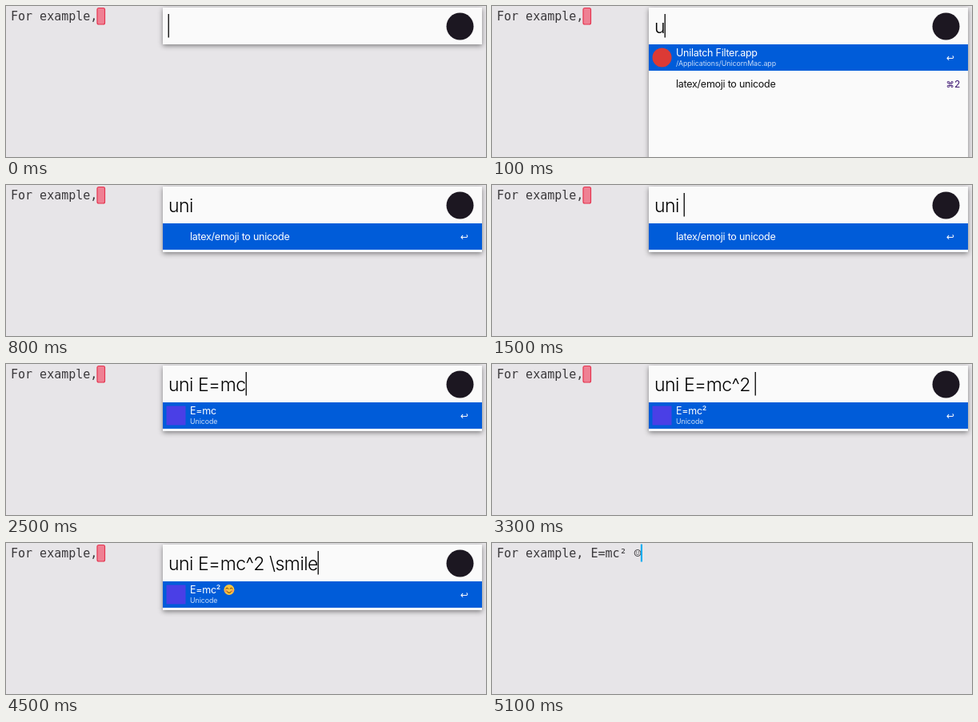
Write an HTML page with a canvas that moves like this. It is 600 px wide and 189 px high and loops after 5.6 s.

```html
<!DOCTYPE html>
<html lang="en">
<head>
<meta charset="utf-8">
<title>Launcher typing</title>
<style>
  html, body { margin: 0; width: 100%; height: 100%; overflow: hidden; background: #e7e5e8; }
  canvas { display: block; width: 600px; height: 189px; }
</style>
</head>
<body>
<canvas id="stage"></canvas>
<script>
const W = 600, H = 189, LOOP = 5600;
const canvas = document.getElementById('stage');
const ctx = canvas.getContext('2d');
const ratio = window.devicePixelRatio || 1;
canvas.width = W * ratio;
canvas.height = H * ratio;

const SANS = 'Inter, "Open Sans", sans-serif';
const MONO = '"DejaVu Sans Mono", monospace';
const SYMBOLS = '"DejaVu Sans", sans-serif';
const PANEL = { x: 196, y: 2, w: 399, head: 48, row: 33, foot: 3 };

const dot = (color, r) => ({ color, r });
const square = color => ({ color, side: 24 });

const app = {
  icon: dot('#dc3a35', 12),
  title: 'Unilatch Filter.app',
  sub: '/Applications/UnicornMac.app'
};
const keyword = { title: 'latex/emoji to unicode' };
const result = (title, face) => ({ icon: square('#4a3fe6'), title, sub: 'Unicode', face });
const search = (name, icon) => ({ icon, title: `Search ${name} for 'uni E=mc^2 \\'` });
const searches = [
  search('Tundle', dot('#4285f4', 13)),
  search('Mirvon', dot('#221f1f', 12)),
  search('Lexoramia', dot('#222222', 12))
];

// Each step: start time, typed query, result rows, fixed panel bottom
const steps = [
  [0, '', []],
  [100, 'u', [app, keyword], 200],
  [200, 'un', [app, keyword], 200],
  [300, 'uni', [app, keyword]],
  [400, 'uni ', [keyword]],
  [1700, 'uni E', [keyword]],
  [1800, 'uni E', [result('E')]],
  [2300, 'uni E=', [result('E=')]],
  [2400, 'uni E=m', [result('E=m')]],
  [2500, 'uni E=mc', [result('E=mc')]],
  [3100, 'uni E=mc^', [result('E=mc^')]],
  [3200, 'uni E=mc^2', [result('E=mc²')]],
  [3300, 'uni E=mc^2 ', [result('E=mc²')]],
  [3700, 'uni E=mc^2 \\', searches],
  [3800, 'uni E=mc^2 \\', [result('E=mc² \\')]],
  [4100, 'uni E=mc^2 \\s', [result('E=mc² \\s')]],
  [4200, 'uni E=mc^2 \\sm', [result('E=mc² \\sm')]],
  [4300, 'uni E=mc^2 \\smi', [result('E=mc² \\smi')]],
  [4400, 'uni E=mc^2 \\smil', [result('E=mc² \\smil')]],
  [4500, 'uni E=mc^2 \\smile', [result('E=mc² ', true)]]
];
const caretOff = [[800, 1500], [2900, 3100]];
const CLOSE = 4700, BLUR = 4800, PASTE = 4900, CARET = 5100;

function text(str, x, y, font, color, spacing = 0) {
  ctx.font = font;
  ctx.letterSpacing = spacing + 'px';
  ctx.fillStyle = color;
  ctx.fillText(str, x, y);
  return x + ctx.measureText(str).width;
}

function rect(x, y, w, h, color) {
  ctx.fillStyle = color;
  ctx.fillRect(x, y, w, h);
}

function disc(x, y, r, color) {
  ctx.fillStyle = color;
  ctx.beginPath();
  ctx.arc(x, y, r, 0, Math.PI * 2);
  ctx.fill();
}

function arc(x, y, r, from, to) {
  ctx.beginPath();
  ctx.arc(x, y, r, from * Math.PI, to * Math.PI);
  ctx.stroke();
}

function drawFace(x, y) {
  disc(x, y, 6.5, '#fcc53d');
  disc(x - 4, y + 1.5, 1.5, '#f5915a');
  disc(x + 4, y + 1.5, 1.5, '#f5915a');
  ctx.strokeStyle = '#6b3d13';
  ctx.lineWidth = 1;
  arc(x - 2.6, y - 0.8, 1.4, 1, 2);
  arc(x + 2.6, y - 0.8, 1.4, 1, 2);
  arc(x, y + 1, 2.8, 0.1, 0.9);
}

function drawIcon(icon, x, y) {
  if (icon.r) disc(x, y, icon.r, icon.color);
  else rect(x - icon.side / 2, y - icon.side / 2, icon.side, icon.side, icon.color);
}

function drawRow(row, i) {
  const y = PANEL.head + i * PANEL.row;
  const selected = i === 0;
  const ink = selected ? '#ffffff' : '#111111';
  if (selected) rect(PANEL.x, y, PANEL.w, PANEL.row, '#005cd9');
  if (row.icon) drawIcon(row.icon, 212.5, y + 16.5);

  const end = text(row.title, 230, y + (row.sub ? 15 : 21), '12.5px ' + SANS, ink, -0.25);
  if (row.sub) text(row.sub, 230, y + 26.5, '8.8px ' + SANS, selected ? '#c9dcf7' : '#666666', -0.05);
  if (row.face) drawFace(end + 7.5, y + 10.5);

  if (selected) text('↩', 568, y + 21, '12px ' + SYMBOLS, ink);
  else {
    const x = text('⌘', 567.5, y + 21, '10.5px ' + SYMBOLS, '#3b1470');
    text(String(i + 1), x, y + 21, '12px ' + SANS, '#3b1470');
  }
}

function drawPanel(t) {
  const [, query, rows, bottom] = steps.filter(step => step[0] <= t).pop();
  const listEnd = PANEL.head + (rows.length ? rows.length * PANEL.row + PANEL.foot : 0);
  const height = (bottom || listEnd) - PANEL.y;

  ctx.save();
  ctx.shadowColor = 'rgba(0, 0, 0, 0.45)';
  ctx.shadowBlur = 6 * ratio;
  ctx.shadowOffsetY = 1.5 * ratio;
  rect(PANEL.x, PANEL.y, PANEL.w, height, '#fafafa');
  ctx.restore();

  disc(567.5, 25.5, 17, '#1c1721');
  rows.forEach(drawRow);

  const end = text(query, 203, 34, '300 23px ' + SANS, '#000000', -0.5);
  const hidden = caretOff.some(([from, to]) => t >= from && t < to);
  if (!hidden) rect(Math.round(end) - 0.5, 10, 1.5, 29.5, '#222222');
}

function drawBlockCursor() {
  ctx.beginPath();
  ctx.roundRect(114, 2.5, 9.5, 20.5, 2);
  ctx.fillStyle = '#ef8093';
  ctx.fill();
  ctx.strokeStyle = '#e5344f';
  ctx.lineWidth = 1.2;
  ctx.stroke();
}

function draw(t) {
  ctx.setTransform(ratio, 0, 0, ratio, 0, 0);
  rect(0, 0, W, H, '#e7e5e8');
  const line = 'For example,' + (t >= PASTE ? ' E=mc² ☺' : '');
  text(line, 6, 18, '15px ' + MONO, '#3a383b');
  if (t < BLUR) drawBlockCursor();
  if (t < CLOSE) drawPanel(t);
  if (t >= CARET) rect(185.8, 1.5, 2.2, 22, '#16aef0');
}

const start = performance.now();
function tick() {
  draw((performance.now() - start) % LOOP);
  requestAnimationFrame(tick);
}
tick();
</script>
</body>
</html>
```
